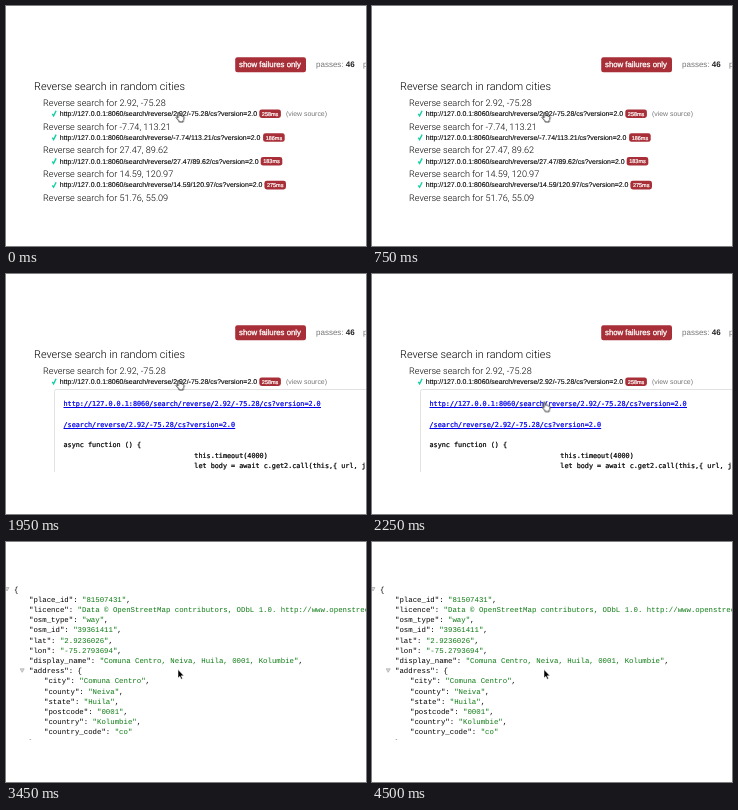
Recreate the animation shown at these times as an HTML page. Size 360x240 px, loop 5.25 s.

```html
<!DOCTYPE html>
<html lang="en">
<head>
<meta charset="utf-8">
<title>Test report</title>
<style>
  html, body { margin: 0; width: 100%; height: 100%; overflow: hidden; background: #fff; }
  svg { display: block; width: 100vw; height: 100vh; }
  text { white-space: pre; text-rendering: geometricPrecision; fill: #000; }
  .sans { font-family: "Liberation Sans", Arial, sans-serif; }
  .light { font-family: Roboto, "Liberation Sans", sans-serif; font-weight: 300; }
  .h1 { font-size: 10.85px; }
  .h2 { font-size: 9.1px; }
  .url { font-size: 6.94px; stroke: #000; stroke-width: .12; }
  .src { font-size: 6.9px; fill: #777; }
  .stat { font-size: 8px; }
  .stat .dim { fill: #777; }
  .stat .num { font-weight: bold; fill: #222; }
  .btn { font-size: 7.8px; fill: #fff; stroke: #fff; stroke-width: .3; }
  .badge { font-size: 5.5px; fill: #fff; stroke: #fff; stroke-width: .22; text-anchor: middle; }
  .red { fill: #a82f37; }
  .tick { fill: none; stroke: #12cfa4; stroke-width: 1.4; }
  .code { font: 6.79px "DejaVu Sans Mono", monospace; stroke: #000; stroke-width: .22; }
  .link { fill: #0000e6; stroke: #0000e6; }
  .line { stroke: #0000e6; stroke-width: 1; }
  .json { font: 7.37px "Liberation Mono", "Courier New", monospace; }
  .json .val { fill: #0b7a12; }

  #report, #list, #source, #json, #hand { animation: 5250ms step-end infinite; }
  #report { animation-name: report; }
  #list { animation-name: list; }
  #source { animation-name: source; }
  #json { animation-name: json; }
  #hand { animation-name: hand; }
  @keyframes report { 0% { opacity: 1 } 57.14%, 100% { opacity: 0 } }
  @keyframes list { 0% { opacity: 1 } 28.57%, 100% { opacity: 0 } }
  @keyframes source { 0% { opacity: 0 } 28.57%, 100% { opacity: 1 } }
  @keyframes json { 0% { opacity: 0 } 57.14%, 100% { opacity: 1 } }
  @keyframes hand {
    0% { transform: translate(169.3px, 106px) }
    42.857%, 100% { transform: translate(169.3px, 127.6px) }
  }
</style>
</head>
<body>
<svg viewBox="0 0 360 240">
  <defs>
    <clipPath id="view"><rect y="44" width="360" height="154"/></clipPath>
  </defs>
  <g clip-path="url(#view)">
    <g id="report">
      <rect class="red" x="229.2" y="51.2" width="70.8" height="15" rx="2.2"/>
      <text class="sans btn" x="233" y="61.4">show failures only</text>
      <text class="sans stat" x="310" y="61.4"><tspan class="dim">passes:</tspan> <tspan class="num">46</tspan></text>
      <text class="sans stat" x="357" y="61.4"><tspan class="dim">p</tspan></text>
      <text class="light h1" x="28" y="84.1">Reverse search in random cities</text>
      <g id="first"></g>
      <text class="sans src" x="280" y="110">(view source)</text>
      <g id="list"></g>
      <g id="source">
        <rect x="48.5" y="115.5" width="330" height="110" rx="2" fill="#fff" stroke="#e2e2e2"/>
        <text class="code link" x="57.5" y="132">http://127.0.0.1:8060/search/reverse/2.92/-75.28/cs?version=2.0</text>
        <path class="line" d="M57.5 133.5H315"/>
        <text class="code link" x="57.5" y="152.8">/search/reverse/2.92/-75.28/cs?version=2.0</text>
        <path class="line" d="M57.5 154.5H229.2"/>
        <text class="code" x="57.5" y="173.3">async function () {</text>
        <text class="code" x="188.3" y="183.6">this.timeout(4000)</text>
        <text class="code" x="188.3" y="193.8">let body = await c.get2.call(this,{ url, j</text>
      </g>
      <g id="hand">
        <path d="M2.3 .9C2.6 .2 3.7 .2 3.9 1L4.3 3.7C5 3.2 5.8 3.4 6 4C6.7 3.6 7.4 3.9 7.6 4.6C8.4 4.4 8.9 4.9 8.8 5.8C8.8 7.2 8.4 7.8 7.9 8.6V10H3.8V9.1C2.9 8 2 6.9 1.1 5.9C.5 5.1 1.4 4.4 2.1 5L2.9 5.7Z"
          fill="#fff" stroke="#111" stroke-width=".8" stroke-linejoin="round"/>
      </g>
    </g>
    <g id="json">
      <rect width="360" height="240" fill="#fff"/>
      <path d="M-1 45.5H3L1 49ZM14.2 126.8H18.2L16.2 130.3Z" fill="#ddd" stroke="#999" stroke-width=".6"/>
      <path d="M172 127.6V136L173.9 134.3L175.2 137.2L176.5 136.6L175.2 133.8H177.9Z"
        fill="#000" stroke="#fff" stroke-width=".5"/>
    </g>
  </g>
</svg>
<script>
  const $ = id => document.getElementById(id);
  const add = (id, markup) => $(id).insertAdjacentHTML("beforeend", markup);

  // One test: heading, tick, address and its duration
  function test(id, y, lat, lon, ms, badgeX) {
    add(id, `<text class="light h2" x="37" y="${y}">Reverse search for ${lat}, ${lon}</text>`);
    if (!ms) return;
    add(id, `
      <path class="tick" d="M46.3 ${y + 8.2}l1.3 1.9l2.5-5"/>
      <text class="sans url" x="53.8" y="${y + 10.2}">http://127.0.0.1:8060/search/reverse/${lat}/${lon}/cs?version=2.0</text>
      <rect class="red" x="${badgeX}" y="${y + 3.7}" width="21.6" height="8.6" rx="2.4"/>
      <text class="sans badge" x="${badgeX + 10.8}" y="${y + 10}">${ms}ms</text>`);
  }
  test("first", 99.7, "2.92", "-75.28", 258, 253.3);
  test("list", 123.5, "-7.74", "113.21", 186, 257.1);
  test("list", 147.3, "27.47", "89.62", 183, 254.7);
  test("list", 171.1, "14.59", "120.97", 275, 258.4);
  test("list", 194.9, "51.76", "55.09");

  let row = 0;
  const put = (x, markup) =>
    add("json", `<text class="json" x="${x}" y="${(49.6 + 10.2 * row++).toFixed(1)}">${markup}</text>`);
  const pairs = (x, data) => {
    for (const [key, val] of Object.entries(data)) {
      const comma = key === "country_code" ? "" : ",";
      put(x, `"${key}": <tspan class="val">"${val}"</tspan>${comma}`);
    }
  };
  put(8, "{");
  pairs(23, {
    place_id: "81507431",
    licence: "Data © OpenStreetMap contributors, ODbL 1.0. http://www.openstreetmap.org/copyright",
    osm_type: "way",
    osm_id: "39361411",
    lat: "2.9236026",
    lon: "-75.2793694",
    display_name: "Comuna Centro, Neiva, Huila, 0001, Kolumbie"
  });
  put(23, '"address": {');
  pairs(38, {
    city: "Comuna Centro",
    county: "Neiva",
    state: "Huila",
    postcode: "0001",
    country: "Kolumbie",
    country_code: "co"
  });
  put(23, "}");
  // keep the pointer above the text
  $("json").append($("json").querySelectorAll("path")[1]);
</script>
</body>
</html>
```
